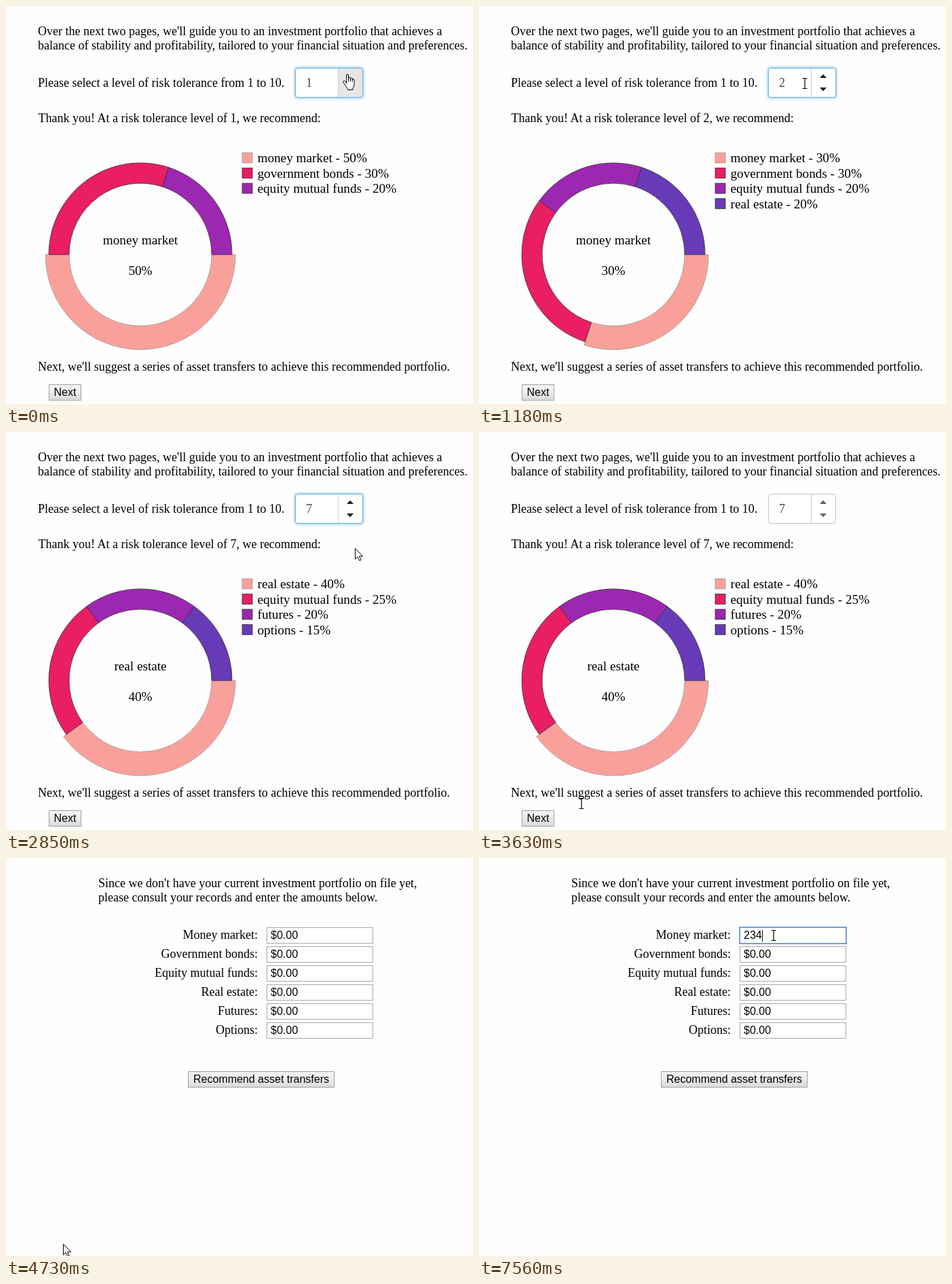
Recreate the animation shown at these times as an HTML page. Size 688 by 586 pixels, loop 8000 ms.

```html
<!DOCTYPE html>
<html lang="en">
<head>
<meta charset="utf-8">
<title>Portfolio adviser</title>
<style>
html, body { margin: 0; width: 100%; height: 100%; overflow: hidden; background: #fefefe; }
svg { display: block; width: 688px; height: 586px; }
text { font: 18px "Liberation Serif", "Times New Roman", serif; fill: #000; white-space: pre; }
.chart text { font-size: 19.2px; }
text.ui { font: 16px "Liberation Sans", Arial, sans-serif; }
.mid { text-anchor: middle; }
.end { text-anchor: end; }
</style>
</head>
<body>
<svg viewBox="0 0 688 586">
  <defs>
    <linearGradient id="face" x2="0" y2="1">
      <stop offset="0" stop-color="#f4f4f4"/>
      <stop offset=".45" stop-color="#ececec"/>
      <stop offset="1" stop-color="#dadada"/>
    </linearGradient>
    <filter id="glow" x="-20%" y="-30%" width="140%" height="160%">
      <feGaussianBlur stdDeviation="1.6"/>
    </filter>
    <g id="arrow">
      <path d="M.5.5V16.2L4.2 12.8 6.7 18.5 9 17.5 6.6 11.9H11.6Z" fill="#fff" stroke="#000"/>
    </g>
    <g id="ibeam">
      <path d="M.5.5H3Q4 .5 4 1.5Q4 .5 5 .5H7.5M4 1V15M.5 15.5H3Q4 15.5 4 14.5Q4 15.5 5 15.5H7.5" fill="none" stroke="#000" stroke-width="1.2"/>
    </g>
    <g id="hand">
      <path d="M5.5 14.5V2Q5.5.5 7 .5T8.5 2V7.5V5.5Q10 4 11.5 6V8V6.2Q13 5 14.3 6.8V9V7.5Q16.5 6.5 17 9V15.5Q17 19 14.8 21V23.5H7.3V21.5Q5 19 3.5 16L1 12.5Q.2 10.5 2 10.2Q3.3 10.2 5.5 13Z" fill="#fff" stroke="#000" stroke-linejoin="round"/>
      <path d="M8.5 7V11.5M11.5 7V11.5M14.3 8V11.5" stroke="#000"/>
    </g>
  </defs>
  <g id="scene"></g>
</svg>
<script>
const LOOP = 8000, PAGE_TURN = 4730, BLUR = 3390;
const COLORS = ['#f7443a', '#e91e63', '#9c27b0', '#673ab7'];
const MIX = {
  1: [['money market', 50], ['government bonds', 30], ['equity mutual funds', 20]],
  2: [['money market', 30], ['government bonds', 30], ['equity mutual funds', 20], ['real estate', 20]],
  7: [['real estate', 40], ['equity mutual funds', 25], ['futures', 20], ['options', 15]]
};
const FIELDS = ['Money market', 'Government bonds', 'Equity mutual funds', 'Real estate', 'Futures', 'Options'];

// Each step: start time, then the state held until the next step.
const LEVEL = [[0, 1], [660, 2], [2850, 7]];
const VALUE = [[0, '1'], [270, '2'], [2010, ''], [2290, '7']];
const CARET = [[0, 0], [1340, 1], [1860, 0], [2290, 1], [2850, 0]];
const AMOUNT = [[0, '$0.00'], [6580, ''], [7420, '23'], [7560, '234']];
const AMOUNT_CARET = [[0, 0], [6580, 1], [7140, 0], [7420, 1]];
const POINTER = [
  [0, 'hand', 496, 100], [130, 'hand', 503, 100], [390, 'arrow', 560, 116],
  [510, 'arrow', 600, 127], [660, 'arrow', 592, 125], [780, 'arrow', 545, 116],
  [900, 'hand', 500, 102], [1030, 'ibeam', 481, 103], [1180, 'ibeam', 476, 106],
  [1340, 'ibeam', 470, 109], [1480, ''],
  [2850, 'arrow', 514, 171], [2970, 'arrow', 541, 207], [3120, 'arrow', 553, 208],
  [3240, 'arrow', 560, 208], [3390, 'arrow', 565, 208], [3510, 'arrow', 380, 380],
  [3630, 'ibeam', 147, 539], [3790, 'arrow', 119, 566], [4060, 'arrow', 100, 570],
  [4180, 'arrow', 88, 569], [4300, 'arrow', 84, 568],
  [5260, 'ibeam', 343, 240], [5410, 'ibeam', 350, 236], [5690, 'ibeam', 414, 137],
  [5840, 'ibeam', 421, 127], [5960, 'ibeam', 428, 117], [6080, 'ibeam', 433, 110],
  [6200, 'ibeam', 432, 107], [6320, 'ibeam', 431, 105], [6440, 'ibeam', 430, 106]
];

const at = (steps, t) => steps.findLast(step => step[0] <= t).slice(1);
const text = (x, y, s, cls = '', fill = '') =>
  `<text x="${x}" y="${y}" class="${cls}"${fill && ` style="fill:${fill}"`}>${s}</text>`;
const rect = (x, y, w, h, fill, stroke = 'none', extra = '') =>
  `<rect x="${x}" y="${y}" width="${w}" height="${h}" fill="${fill}" stroke="${stroke}" ${extra}/>`;

function button(x, y, w, label, hover) {
  return rect(x + .5, y + .5, w - 1, 23, 'url(#face)', hover ? '#888' : '#a0a0a0') +
    text(x + w / 2, y + 17, label, 'ui mid');
}

function slice(from, to, outer) {
  const point = (r, part) => {
    const a = part / 100 * 2 * Math.PI;
    return `${198 + r * Math.cos(a)} ${366 + r * Math.sin(a)}`;
  };
  const large = to - from > 50 ? 1 : 0;
  return `M${point(outer, from)}A${outer} ${outer} 0 ${large} 1 ${point(outer, to)}` +
    `L${point(105, to)}A105 105 0 ${large} 0 ${point(105, from)}Z`;
}

function chart(mix) {
  let sum = 0;
  const parts = mix.map(([name, share], i) => {
    const look = `stroke-width=".8" opacity="${i ? 1 : .5}"`;
    const y = 216 + i * 22.5;
    const d = slice(sum, sum += share, i ? 135 : 140);
    return `<path d="${d}" fill="${COLORS[i]}" stroke="#333" ${look}/>` +
      rect(348, y, 15, 15, COLORS[i], '#333', look) +
      text(370.5, y + 14, `${name} - ${share}%`);
  });
  const [name, share] = mix[0];
  return `<g class="chart">${parts.join('')}${text(198, 351, name, 'mid')}${text(198, 396, share + '%', 'mid')}</g>`;
}

function spinner(t, hover) {
  const focus = t < BLUR;
  const ink = focus ? '#222' : '#666';
  const frame = 'rx="3.5"';
  return (focus ? rect(426, 91, 100, 44, 'none', '#66afe9', 'rx="4" stroke-width="3" filter="url(#glow)" opacity=".6"') : '') +
    rect(426.5, 91.5, 99, 43, '#fff', 'none', frame) +
    (hover ? rect(489, 92, 36, 42, '#e6e6e6')
           : `<path d="M502 106L507 100.5L512 106ZM502 120H512L507 125.5Z" fill="${ink}"/>`) +
    rect(489, 92, 1, 42, '#ccc') +
    rect(426.5, 91.5, 99, 43, 'none', focus ? '#66afe9' : '#c4c4c4', frame) +
    text(442, 119, at(VALUE, t)[0], '', '#444') +
    (at(CARET, t)[0] ? rect(451, 103, 1, 20, '#444') : '');
}

function riskPage(t, pointer) {
  const [level] = at(LEVEL, t);
  return text(47, 43, "Over the next two pages, we'll guide you to an investment portfolio that achieves a") +
    text(47, 64, 'balance of stability and profitability, tailored to your financial situation and preferences.') +
    text(47, 119, 'Please select a level of risk tolerance from 1 to 10.') +
    spinner(t, pointer === 'hand') +
    text(47.5, 171, `Thank you! At a risk tolerance level of ${level}, we recommend:`) +
    chart(MIX[level]) +
    text(47, 537, "Next, we'll suggest a series of asset transfers to achieve this recommended portfolio.") +
    button(63, 557, 48, 'Next', t >= 4060);
}

function amountsPage(t) {
  const [amount] = at(AMOUNT, t);
  const rows = FIELDS.map((name, i) => {
    const y = 102 + 28 * i;
    const focus = !i && t >= 6580;
    return text(371, y + 17, name + ':', 'end') +
      (focus ? rect(384, y, 157, 24, '#fff', '#729fdc', 'stroke-width="2"')
             : rect(384.5, y + .5, 156, 23, '#fff', '#a9a9a9')) +
      text(390, y + 17, i ? '$0.00' : amount, 'ui');
  });
  const caretX = Math.round(390 + 8.9 * amount.length);
  return text(136, 43, "Since we don't have your current investment portfolio on file yet,") +
    text(136, 64, 'please consult your records and enter the amounts below.') +
    rows.join('') +
    (at(AMOUNT_CARET, t)[0] ? rect(caretX, 106, 1, 17, '#000') : '') +
    button(268, 314, 216, 'Recommend asset transfers');
}

const scene = document.getElementById('scene');
let shown = '';
function draw() {
  const t = performance.now() % LOOP;
  const [pointer, x, y] = at(POINTER, t);
  const markup = (t < PAGE_TURN ? riskPage(t, pointer) : amountsPage(t)) +
    (pointer ? `<use href="#${pointer}" x="${x}" y="${y}"/>` : '');
  if (markup !== shown) scene.innerHTML = shown = markup;
  requestAnimationFrame(draw);
}
draw();
</script>
</body>
</html>
```
